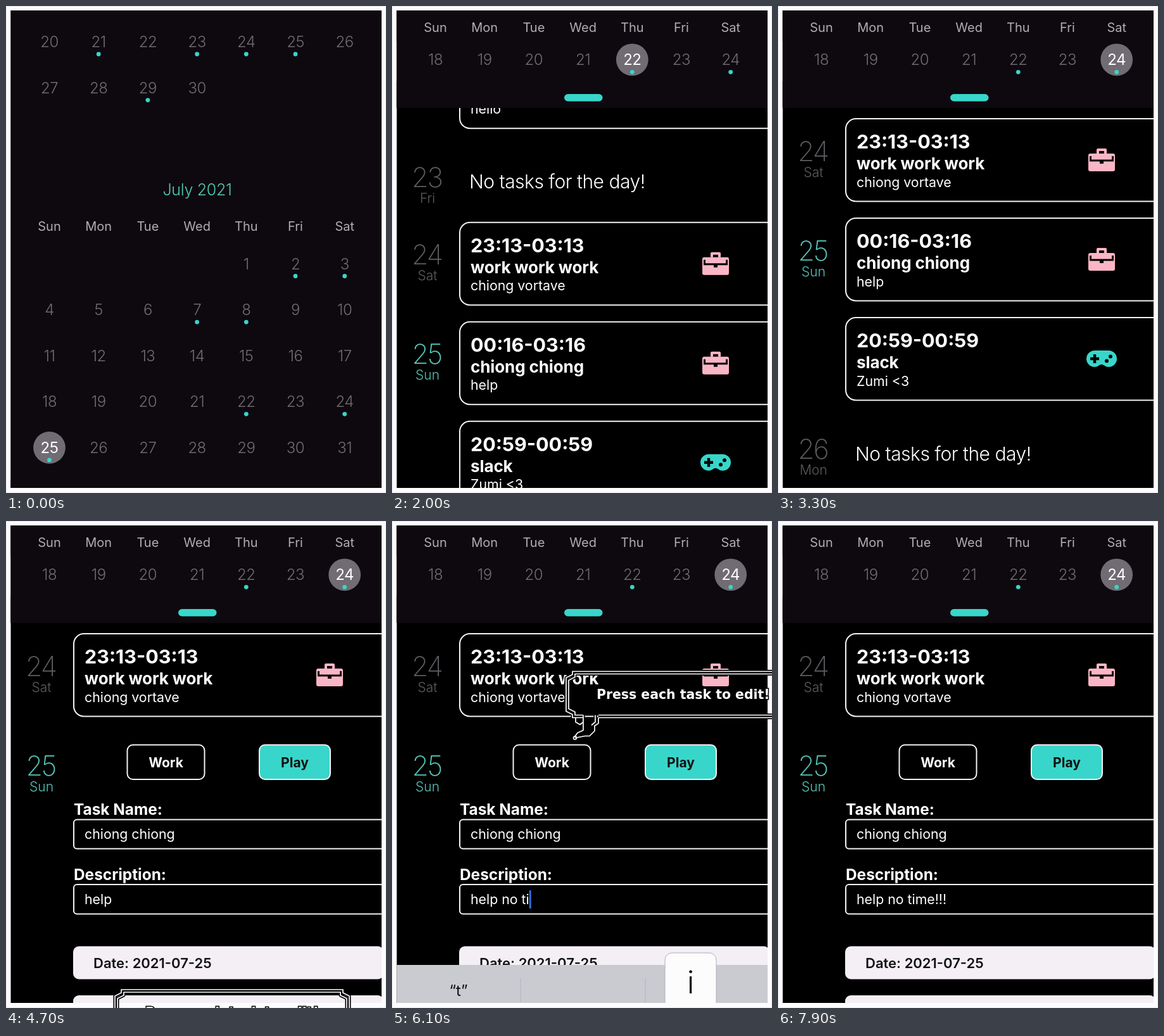
Write an HTML page that moves like this. It is 600 px wide and 769 px high and loops after 8000 ms.

```html
<!DOCTYPE html>
<html lang="en">
<head>
<meta charset="utf-8">
<title>Task agenda</title>
<style>
html, body { margin: 0; width: 100%; height: 100%; overflow: hidden; background: #fdfcfe; }
svg { display: block; width: 600px; height: 769px; font-family: Inter, Roboto, sans-serif; }
text { white-space: pre; }
.mid { text-anchor: middle; }
.day { font-size: 24px; font-weight: 300; letter-spacing: -.5px; fill: #6f6b71; }
.week { font-size: 20px; fill: #b0adb2; }
.month { font-size: 25px; font-weight: 300; letter-spacing: -.3px; fill: #55cbb8; }
.big { font-size: 43px; font-weight: 200; letter-spacing: -2px; }
.small { font-size: 21px; font-weight: 300; }
.time { font-size: 30.5px; font-weight: 700; }
.name { font-size: 26px; font-weight: 700; letter-spacing: -.1px; }
.body { font-size: 21.3px; }
.none { font-size: 30px; font-weight: 300; letter-spacing: -.5px; }
.button { font-size: 21px; font-weight: 700; }
.label { font-size: 24.4px; font-weight: 700; }
.date { font-size: 22px; font-weight: 600; }
.hint { font-size: 24px; }
.key { font-size: 50px; font-weight: 350; }
.shout { font: 700 20.46px "DejaVu Sans", sans-serif; stroke: #000; stroke-width: 3px; paint-order: stroke; }
</style>
</head>
<body>
<svg id="stage" viewBox="0 0 600 769"></svg>
<script>
const LOOP = 8000, STEP = 100;
const TEAL = '#38d6ca', PINK = '#fbb6c6', PANEL = '#0e090f', PALE = '#f3eff5';
const WEEK = ['Sun', 'Mon', 'Tue', 'Wed', 'Thu', 'Fri', 'Sat'];

const colX = c => 68.5 + c * 77.7;
const text = (x, y, cls, s, extra = '') => `<text x="${x}" y="${y}" class="${cls}" ${extra}>${s}</text>`;
const rect = (x, y, w, h, r, attrs) => `<rect x="${x}" y="${y}" width="${w}" height="${h}" rx="${r}" ${attrs}/>`;
const circle = (x, y, r, attrs) => `<circle cx="${x}" cy="${y}" r="${r}" ${attrs}/>`;
const group = (id, body, attrs = '') => `<g id="${id}" ${attrs}>${body}</g>`;
const outline = 'fill="none" stroke="#f4f0f5" stroke-width="2"';

const weekRow = y => WEEK.map((d, c) => text(colX(c), y, 'week mid', d)).join('');

// A month's days, laid out from the cell of the first one
function days(prefix, from, to, col, y, marked) {
  let out = '';
  for (let d = from; d <= to; d++) {
    const cell = col + d - from, x = colX(cell % 7), cy = y + Math.floor(cell / 7) * 72.6;
    out += circle(x, cy, 25.4, `id="${prefix}ring${d}" fill="#716c73" opacity="0"`);
    out += text(x, cy + 8.6, 'day mid', d, `id="${prefix}day${d}"`);
    if (marked.includes(d)) out += circle(x, cy + 19.5, 3.4, `fill="${TEAL}"`);
  }
  return out;
}

function gamepad(x, y) {
  return `<g transform="translate(${x} ${y})" fill="#000">
    <path d="M-11-13H11A13 13 0 1 1 11 13C5 13 4 9 0 9S-5 13-11 13A13 13 0 1 1-11-13Z" fill="${TEAL}"/>
    <path d="M-11-7V7M-18 0H-4" stroke="#000" stroke-width="4.5"/>
    ${circle(8, 3.5, 3, '')}${circle(14, -3.5, 3, '')}</g>`;
}

function briefcase(x, y) {
  return `<g transform="translate(${x} ${y})" fill="#000">
    ${rect(-21, -10, 42, 28, 3, `fill="${PINK}"`)}
    <path d="M-6-10V-16H6V-10" fill="none" stroke="${PINK}" stroke-width="4" stroke-linejoin="round"/>
    <path d="M-17.5-6V1H17.5V-6" fill="none" stroke="#000" stroke-width="3"/>
    ${rect(-3, 1, 6, 5, 0, '')}</g>`;
}

const dateMark = (num, name, y, fill = '#5f5b61') =>
  text(55, y, 'big mid', num, `fill="${fill}"`) + text(56, y + 25, 'small mid', name, `fill="${fill}"`);

const card = (y, time, name, note, icon) =>
  rect(107, y, 520, 130.5, 16, outline) + text(124, y + 47, 'time', time) +
  text(124, y + 80, 'name', name) + text(124, y + 107.5, 'body', note) + icon(511, y + 65);

const free = y => text(122, y, 'none', 'No tasks for the day!');

const agenda =
  dateMark(22, 'Thu', 253.5) + card(187, '22:43-01:43', 'yeet', 'hello', gamepad) +
  dateMark(23, 'Fri', 410.5) + free(412.5) +
  dateMark(24, 'Sat', 532.5) + card(466, '23:13-03:13', 'work work work', 'chiong vortave', briefcase) +
  dateMark(25, 'Sun', 689.5, '#56c5b9') +
  group('later',
    group('pressed', card(623, '00:16-03:16', 'chiong chiong', 'help', briefcase)) +
    card(780, '20:59-00:59', 'slack', 'Zumi &lt;3', gamepad) +
    dateMark(26, 'Mon', 1003) + free(1005.5));

const form =
  rect(191.5, 353.5, 122, 54.5, 9, outline) + text(252.5, 388.5, 'button mid', 'Work') +
  rect(400, 353.5, 112, 54.5, 9, `fill="${TEAL}" stroke="#f4f0f5" stroke-width="2"`) +
  text(456, 388.5, 'button mid', 'Play', 'fill="#111"') +
  text(107, 464, 'label', 'Task Name:') + rect(107, 471.5, 520, 46, 5, outline) +
  text(124, 502, 'body', 'chiong chiong') +
  text(107, 567, 'label', 'Description:') + rect(107, 574, 520, 46.5, 5, outline) +
  text(124, 605, 'body', 'help', 'id="note"') +
  rect(0, 583, 3, 29, 1, 'id="caret" fill="#2f6fe0"') +
  rect(106, 671.5, 490, 52, 9, `fill="${PALE}"`) +
  text(138, 705.5, 'date', 'Date: 2021-07-25', 'fill="#111"') +
  rect(106, 749, 490, 52, 9, `fill="${PALE}"`);

const keyboard =
  rect(0, 701, 600, 70, 0, 'fill="#c9cbd1"') +
  '<path d="M203 722V760M400 722V760" stroke="#b1b4bb"/>' +
  text(105, 750, 'hint mid', '', 'id="hint" fill="#111"') +
  group('popup', rect(-40.5, 682, 81, 100, 11, 'fill="#fcfcfd" stroke="#aeb0b6"') +
    text(0, 746, 'key mid', '', 'id="letter" fill="#111"'));

// Two nested notched frames with a stepped tail
const notched = o => `M51 ${73 - o}H${360 - o}V${68 - o}L${370 - o} ${63 - o}V${10 + o}L${360 - o} ${5 + o}V${o}` +
  `H${10 + o}V${5 + o}L${o} ${10 + o}V${63 - o}L${10 + o} ${68 - o}V${73 - o}H27`;
const tail = 'M51 73V82L45 86V94L37 102H30L14 105M27 69V93L18 97 13 104M15 73V80L22 84 27 80M46 69V80L40 85';
const bubblePath = notched(0) + notched(4) + tail;
const bubble =
  `<g fill="none" stroke-linejoin="round"><path d="${bubblePath}" stroke="#000" stroke-width="5"/>
  <path d="${bubblePath}" stroke="#fff" stroke-width="1.7"/>
  ${circle(14, 105, 2.5, 'stroke="#fff" stroke-width="1.5"')}</g>` +
  text(48, 43, 'shout', 'Press each task to edit!');

const month =
  days('j', 20, 30, 0, 56.5, [21, 23, 24, 25, 29]) +
  text(302, 298.5, 'month mid', 'July 2021') + weekRow(355) +
  days('', 1, 31, 4, 407, [2, 3, 7, 8, 22, 24, 25]);

const stage = document.getElementById('stage');
stage.innerHTML =
  `<clipPath id="screen">${rect(7.5, 7, 585.5, 754, 0, '')}</clipPath>
  <clipPath id="panelClip">${rect(0, 0, 600, 161, 0, 'id="panelEdge"')}</clipPath>
  ${rect(.5, .5, 599, 768, 0, 'fill="#fdfcfe" stroke="#e9e7ee"')}
  <g clip-path="url(#screen)" fill="#fff">
    ${rect(0, 0, 600, 769, 0, 'fill="#000"')}
    ${group('agenda', agenda)}${group('form', form)}
    <g clip-path="url(#panelClip)">
      ${rect(0, 0, 600, 800, 0, `fill="${PANEL}"`)}
      ${group('month', month)}
      ${group('top', rect(0, 0, 600, 56, 0, `fill="${PANEL}"`) + weekRow(41))}
      ${group('knob', rect(0, 119, 600, 44, 0, `fill="${PANEL}"`) + rect(272, 139, 60.5, 11.5, 5.7, `fill="${TEAL}"`))}
    </g>
    ${group('keyboard', keyboard)}
  </g>
  ${group('bubble', bubble, 'fill="#fff"')}`;

const el = {};
stage.querySelectorAll('[id]').forEach(n => el[n.id] = n);

// Time and value pairs, joined by straight runs
const CLOSE = [[300, 0], [400, .1], [500, .35], [600, .65], [700, .85], [800, .95], [900, 1]];
const SCROLL = [[1400, 0], [1600, 25], [1900, 95], [2300, 212], [2500, 262], [2700, 288]];
const KEYS_UP = [[5000, 70], [5100, 35], [5200, 10], [5300, 0], [7300, 0], [7400, 20], [7500, 50], [7600, 70]];
const FLIGHT = [[4400, 775], [4500, 765], [4700, 740], [5000, 638], [5400, 484], [6100, 237.5], [6700, 52], [7200, -90], [7300, -125]];
// Time, typed text, suggestion, key column (if its popup reaches into view)
const TYPING = [
  [0, 'help', 'help'], [5500, 'help ', ''], [5600, 'help n', 'n'], [5700, 'help no', 'no', 8],
  [5900, 'help no ', ''], [6000, 'help no t', 't', 4], [6100, 'help no ti', 't', 7],
  [6300, 'help no tim', 'tim'], [6500, 'help no time', 'time', 2],
  [6700, 'help no time!', ''], [6800, 'help no time!!', ''], [6900, 'help no time!!!', '']
];

function track(points, t) {
  const i = points.findIndex(p => p[0] > t);
  if (i === 0) return points[0][1];
  if (i < 0) return points[points.length - 1][1];
  const [t0, a] = points[i - 1], [t1, b] = points[i];
  return a + (b - a) * (t - t0) / (t1 - t0);
}

const move = (node, x, y) => node.setAttribute('transform', `translate(${x} ${y})`);
const show = (node, on) => node.setAttribute('display', on ? 'inline' : 'none');

function select(day) {
  for (const d of [22, 24, 25]) {
    const on = d === day;
    el['ring' + d].setAttribute('opacity', on ? 1 : 0);
    el['day' + d].style.fill = on ? '#fff' : d === 25 ? '#55cbb8' : '';
    el['day' + d].style.fontWeight = on ? 400 : 300;
  }
}

function render(t) {
  const closed = track(CLOSE, t), bottom = 790 - 629 * closed;
  el.panelEdge.setAttribute('height', bottom);
  move(el.month, 0, -540 * closed);
  move(el.knob, 0, bottom - 161);
  el.top.setAttribute('opacity', Math.max(0, (closed - .5) * 2));
  move(el.agenda, 0, bottom - 161 - track(SCROLL, t));
  select(t < 200 ? 25 : t < 2700 ? 22 : 24);

  const editing = t >= 4200;
  show(el.later, !editing);
  show(el.form, editing);
  el.pressed.setAttribute('opacity', t >= 3900 ? .4 : 1);

  const [at, typed, hint, key] = TYPING.filter(s => s[0] <= t).pop();
  el.note.textContent = typed;
  el.hint.textContent = hint && `“${hint}”`;
  const focused = t >= 5000 && t < 7400;
  show(el.caret, focused);
  if (focused) el.caret.setAttribute('x', 124 + el.note.getComputedTextLength());
  move(el.keyboard, 0, track(KEYS_UP, t));
  const popped = key !== undefined && t - at < STEP;
  show(el.popup, popped);
  if (popped) {
    el.letter.textContent = typed.slice(-1);
    move(el.popup, 471.5 + (key - 7) * 61.7, 0);
  }

  const y = track(FLIGHT, t);
  show(el.bubble, y < 770 && y > -110);
  move(el.bubble, 172 + (740 - y) * .2048, y);
}

const start = performance.now();
function tick() {
  const t = (performance.now() - start) % LOOP;
  render(Math.floor(t / STEP) * STEP);
  requestAnimationFrame(tick);
}
tick();
</script>
</body>
</html>
```
